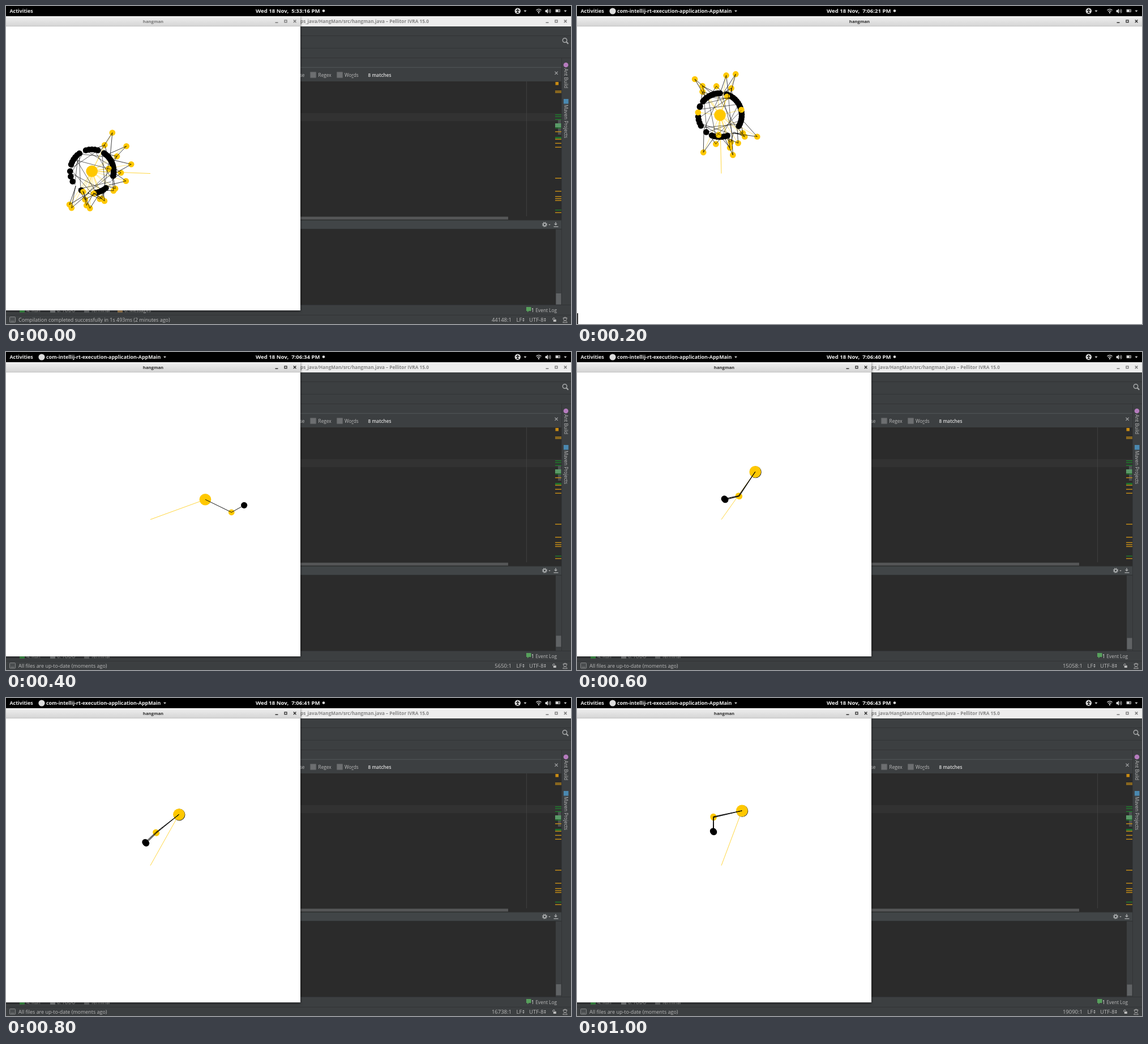
Recreate the animation shown at these times as an HTML page. Size 998 px wide and 561 px high, loop 1.2 s.

```html
<!DOCTYPE html>
<html lang="en">
<head>
<meta charset="utf-8">
<title>hangman</title>
<style>
html, body { margin: 0; width: 100%; height: 100%; overflow: hidden; background: #3c3f41; }
svg { display: block; width: 100vw; height: 100vh; }
text { font: 8.3px "Open Sans", "Noto Sans", sans-serif; fill: #bbb; white-space: pre; }
.bar { font-weight: 700; font-size: 8.9px; fill: #eee; }
.clock { font-weight: 700; font-size: 9.6px; fill: #eee; }
.title { font-weight: 700; font-size: 7.7px; }
.status { font-size: 8.95px; }
.caret { font-size: 9.5px; }
.win { filter: drop-shadow(0 1px 2px rgba(0, 0, 0, .6)); }
.frame { visibility: hidden; animation: show 1200ms step-end infinite; }
@keyframes show {
  0% { visibility: visible; }
  16.6666%, 100% { visibility: hidden; }
}
</style>
</head>
<body>
<svg viewBox="0 0 998 561" preserveAspectRatio="none">
  <defs>
    <linearGradient id="chrome" x2="0" y2="1">
      <stop stop-color="#fff"/><stop offset=".06" stop-color="#eee"/><stop offset="1" stop-color="#d4d4d4"/>
    </linearGradient>
    <g id="buttons" fill="none" stroke="currentColor">
      <path d="M-34.5 29.3h5" stroke-width="1.5"/>
      <rect x="-18" y="25" width="4" height="3.8" stroke-width="1.3"/>
      <path d="M-2.2 24.6l4.6 4.6m0-4.6l-4.6 4.6" stroke-width="1.4"/>
    </g>
    <path id="drop" d="M-2.5-1.3h5l-2.5 2.9z"/>
    <path id="updown" d="M-1.8-.8l1.8-2.4 1.8 2.4zM-1.8.8l1.8 2.4 1.8-2.4z" fill="#bbb"/>
    <rect id="check" y="116.3" width="10.5" height="10.5" rx="1" fill="#6c6e70" stroke="#55585a" stroke-width=".7"/>
  </defs>

  <!-- editor window -->
  <rect width="998" height="561" fill="#3c3f41"/>
  <rect x="515" y="18" width="483" height="18" fill="#ededed"/>
  <text class="title" x="520" y="30" style="fill:#858585;font-size:8.2px">ps_java/HangMan/src/hangman.java – Pellitor IVRA 15.0</text>
  <use href="#buttons" x="988" color="#777"/>
  <g stroke="#303234" stroke-width=".8">
    <path d="M519 52.5h479M519 74.5h479M519 91.5h479M981.5 92v435M519 527.4h479M0 545.3h998"/>
    <path d="M519 108.3h462" stroke="#5a5d5f"/>
  </g>
  <g fill="none" stroke="#a5a7a8">
    <circle cx="987" cy="60.5" r="3.7" stroke-width="1.5"/>
    <path d="M989.8 63.3l3.4 3.5" stroke-width="2.1"/>
    <path d="M969.5 115.7l5.2 5.2m0-5.2l-5.2 5.2" stroke-width="1.2"/>
  </g>
  <text x="527.5" y="125" text-anchor="end">Match Case</text>
  <use href="#check" x="537.3"/><use href="#check" x="584.3"/>
  <text x="551.5" y="125">Re<tspan text-decoration="underline">g</tspan>ex</text>
  <text x="598" y="125">Wo<tspan text-decoration="underline">r</tspan>ds</text>
  <text x="639.5" y="125" style="font-weight:600;fill:#ddd">8 matches</text>

  <rect x="515" y="133" width="466" height="244.5" fill="#2b2b2b"/>
  <rect x="515" y="189" width="466" height="14" fill="#323232"/>
  <path d="M919.5 133v238" stroke="#444" stroke-width=".8"/>
  <rect x="515" y="371.7" width="372" height="5" fill="#555657"/>
  <rect x="975" y="200" width="5.5" height="27" fill="#4d5052"/>
  <rect x="970.5" y="134" width="5.5" height="5.5" fill="#c88a12"/>
  <g id="marks"></g>
  <rect x="970" y="207" width="10.5" height="7" fill="#5a9a68"/>

  <rect x="515" y="378" width="466" height="15.5" fill="#414547"/>
  <path d="M519 377.8h462M519 393.6h462" stroke="#2a2c2d" stroke-width=".8"/>
  <rect x="515" y="394" width="456" height="133" fill="#2b2b2b"/>
  <g stroke="#b0b2b3" fill="none">
    <circle cx="951.5" cy="385.5" r="2.5" stroke-width="1.7"/>
    <circle cx="951.5" cy="385.5" r="4" stroke-width="1.2" stroke-dasharray="1.57"/>
    <path d="M971 381v5m-2.2-2l2.2 2.2 2.2-2.2M967.5 389.3h8" stroke-width="1.2"/>
  </g>
  <use href="#drop" transform="translate(960 386) scale(.7)" fill="#aaa"/>

  <circle cx="989" cy="104" r="4.3" fill="#b57bbd"/>
  <rect x="985" y="164" width="8.5" height="8.5" fill="#4a88b0"/>
  <text transform="translate(986 110) rotate(90)">Ant Build</text>
  <text transform="translate(986 174) rotate(90)">Maven Projects</text>

  <path d="M919 531h8.5v7h-4l-2.5 2.5v-2.5h-2z" fill="#57a05c"/>
  <text x="928" y="540" style="fill:#eee">1</text>
  <text x="935.5" y="540">Event Log</text>

  <rect x="6.5" y="548.5" width="10" height="9.5" rx="1" fill="#4b4e50" stroke="#8c8e8f" stroke-width=".9"/>
  <path d="M8.5 556h6" stroke="#8c8e8f" stroke-width=".8"/>
  <text class="caret" x="901.5" y="557">LF</text><use href="#updown" x="914" y="553.5"/>
  <text class="caret" x="924" y="557">UTF-8</text><use href="#updown" x="952" y="553.5"/>
  <path d="M965.8 553.5v-1.5a1.8 1.8 0 0 1 3.6 0" fill="none" stroke="#bbb"/>
  <rect x="966.8" y="553" width="5" height="4" fill="#bbb"/>
  <g fill="none" stroke="#aaa" stroke-width=".9">
    <circle cx="987.5" cy="552" r="3"/><path d="M983.5 550.5h8M983.8 558.5c0-4 7.4-4 7.4 0z"/>
  </g>

  <g id="frames"></g>

  <!-- desktop panel icons -->
  <g fill="#ddd">
    <circle cx="561" cy="8.5" r="2.3"/>
    <circle cx="903.8" cy="8.8" r="5.2"/>
    <circle cx="903.8" cy="6" r="1" fill="#000"/>
    <path d="M900.8 7.9h6M903.8 8v2l-1.8 2.8M903.8 10l1.8 2.8" fill="none" stroke="#000" stroke-width="1.1"/>
    <use href="#drop" x="917" y="9"/><use href="#drop" x="988" y="9"/>
    <path d="M936.5 7.5q4.5-3.6 9 0M938.3 9.7q2.7-2 5.4 0" fill="none" stroke="#ddd" stroke-width="1.2"/>
    <circle cx="941" cy="11.8" r="1.2"/>
    <path d="M952.5 7.3h2l2.7-2.5v8.4l-2.7-2.5h-2z"/>
    <path d="M958.8 6.7q1.6 2.3 0 4.6M960.7 5.3q2.7 3.7 0 7.4" fill="none" stroke="#ddd"/>
    <rect x="971" y="6.3" width="7.5" height="4.2" fill="#555" stroke="#ccc" stroke-width=".8"/>
    <rect x="971.4" y="6.6" width="4" height="3.6"/>
  </g>
</svg>
<script>
const GOLD = '#ffc800';
const PIVOT = [255, 295.5];
const BEAM = 103.2, UPPER = 51.5, LOWER = 25.6, RING = 38.5;
const $ = id => document.getElementById(id);

const text = (x, y, s, cls = '', attrs = '') => `<text x="${x}" y="${y}" class="${cls}" ${attrs}>${s}</text>`;
const rect = (x, y, w, h, fill) => `<rect x="${x}" y="${y}" width="${w}" height="${h}" fill="${fill}"/>`;
const ball = ([x, y], r, fill) => `<circle cx="${x}" cy="${y}" r="${r}" fill="${fill}"/>`;
const line = (a, b, color = '#000', w = .75) =>
  `<path d="M${a[0]} ${a[1]}L${b[0]} ${b[1]}" stroke="${color}" stroke-width="${w}"/>`;
const range = (n, f) => Array.from({ length: n }, (_, k) => f(k));

// point at an angle in degrees, clockwise from the right
function polar([x, y], r, deg) {
  const a = deg * Math.PI / 180;
  return [x + r * Math.cos(a), y + r * Math.sin(a)];
}

function random(seed) {
  return () => (seed = seed * 16807 % 2147483647) / 2147483647;
}

const stripe = (color, ys) => ys.map(y => rect(970, y, 11, 1.5, color)).join('');
$('marks').innerHTML =
  stripe('#c08a18', [149.4, 151.8, 221, 234.3, 241.5, 248.4, 303, 326, 335.5, 339, 342.4, 363.7]) +
  stripe('#1f7a2c', [191, 194.5, 199.5, 214.5, 231, 232.5, 359.3]);

const hubBall = ([x, y], rim) => (rim ? ball([x + .6, y + .5], 10.4, '#222') : '') + ball([x, y], 10.3, GOLD);

// double pendulum hanging from a beam; drift in degrees fans out close copies
function arm(beam, upper, lower, drift = 0) {
  const hub = polar(PIVOT, BEAM, beam);
  const copies = (drift ? [.5, 0, -.5] : [0]).map(k => {
    const elbow = polar(hub, UPPER, upper + k * drift);
    return { elbow, tip: polar(elbow, LOWER, lower + k * drift) };
  });
  return line(PIVOT, hub, GOLD) + hubBall(hub, drift) +
    copies.map(c => ball(c.elbow, 5.4, GOLD) + ball(c.tip, 5.6, '#000')).join('') +
    copies.map(c => line(hub, c.elbow, '#000', .9) + line(c.elbow, c.tip, '#000', .9)).join('');
}

const fan = (n, from, step, radius) => range(n, k => [radius(k), from + step * k]);

// many pendulums at once: black balls along ring arcs, gold balls in fans
function swarm(hub, seed, arcs, fans) {
  const rnd = random(seed);
  const on = deg => polar(hub, RING, deg);
  const black = arcs.flatMap(([n, from, to]) => range(n, k => on(from + (to - from) * k / (n - 1 || 1))));
  const gold = fans.flat().map(([r, deg]) => ({ r, deg, at: polar(hub, r, deg) }));
  const ties = gold.filter(g => g.r > RING + 6).map(g =>
    line(g.at, on(g.deg - 5 - 25 * rnd())) + line(g.at, on(g.deg + 5 + 25 * rnd())));
  const chords = range(16, k => {
    const a = k * 22.5 + 15 * rnd();
    return line(on(a), on(a + 75 + 75 * rnd()), '#000', .6);
  });
  return line(PIVOT, hub, GOLD) +
    gold.map(g => line(hub, g.at, GOLD, .5)).join('') +
    hubBall(hub) +
    black.map(p => ball(p, 5.3, '#000')).join('') +
    gold.map(g => ball(g.at, 5.3, GOLD)).join('') +
    ties.join('') + chords.join('');
}

const elbows = () => UPPER;

const low = swarm([151.7, 291.5], 7,
  [[3, 152, 180], [6, 198, 235], [5, 254, 286], [14, 304, 372], [5, 50, 80], [1, 119, 119]],
  [
    fan(5, -62, 26, k => 77 - 1.6 * k * k),
    fan(6, -64, 33.5, elbows),
    fan(3, 67, 26, k => 57 + 8.5 * k),
    fan(3, 74, 25, k => 51 + 10 * k),
    fan(2, 85, 28, () => 39.5),
    fan(1, -9, 0, () => 30)
  ]);

const high = swarm([252.5, 192.5], 11,
  [[11, 219, 270], [17, 288, 390], [7, 70, 112], [1, 129, 129], [4, 151, 176], [2, 202, 204]],
  [
    fan(2, -125, 56, () => 77.5),
    fan(3, -127, 30, elbows),
    fan(2, -121, 40, k => 60 + 11 * k),
    fan(3, 30, 42, k => 76 - 2 * k),
    fan(3, 38, 30, elbows),
    fan(3, 41, 16, k => 58 + k),
    fan(2, -69, 163, () => 35),
    fan(2, -14, 201, () => 39)
  ]);

const tab = (x, label, color) => rect(x, 532, 9, 8.5, color) + text(x + 12, 540, label);

function ide(status, caret, scroll) {
  return tab(24, '4: Run', '#3f9f4a') + tab(78, '6: TODO', '#8a8d8f') + tab(138, 'Terminal', '#77797b') +
    rect(971.5, scroll, 9, 19.5, '#606365') +
    text(22, 557, status, 'status') + text(893, 557, caret, 'caret', 'text-anchor="end"');
}

function appWindow(w, h, color) {
  const body = rect(-4, 18, w + 4, 18 + h, '#fff') + rect(-4, 18, w + 4, 18, 'url(#chrome)') +
    rect(-4, 35.4, w + 4, .7, '#bcbcbc');
  return `<g class="win">${body}</g>` +
    text(w / 2, 30, 'hangman', 'title', `text-anchor="middle" style="fill:${color}"`) +
    `<use href="#buttons" x="${w - 10}" color="${color}"/>`;
}

const panel = (time, menu) => rect(0, 0, 998, 18, '#000') +
  text(6.5, 12.3, 'Activities', 'bar') +
  text(441, 12.3, `Wed 18 Nov,&#160; ${time} PM`, 'clock') +
  (menu ? ball([63, 9], 5.6, '#ddd') +
    text(71, 12.3, 'com-intellij-rt-execution-application-AppMain', 'bar') +
    '<use href="#drop" x="280.5" y="9" fill="#ddd"/>' : '');

const small = (time, caret, scroll, pendulum) =>
  ide('All files are up-to-date (moments ago)', caret, scroll) +
  appWindow(520, 501, '#2e2e2e') + pendulum + panel(time, true);

const scenes = [
  ide('Compilation completed successfully in 1s 493ms (2 minutes ago)', '44148:1', 507) +
    tab(197, '0: Messages', '#b08a58') + appWindow(520, 501, '#777') + low + panel('5:33:16'),
  appWindow(998, 525, '#2e2e2e') + rect(0, 542, 2, 19, '#333') + high + panel('7:06:21', true),
  small('7:06:34', '5650:1', 500.5, arm(-20, 26, -29)),
  small('7:06:40', '15058:1', 504.5, arm(-54.6, 124, 167, 2)),
  small('7:06:41', '16738:1', 505, arm(-60.7, 141.5, 136, 2)),
  small('7:06:43', '19090:1', 505.5, arm(-69.4, 167.5, 90, 2))
];

$('frames').innerHTML = scenes.map((s, i) =>
  `<g class="frame" style="animation-delay:${i * 200 - 1200}ms">${s}</g>`).join('');
</script>
</body>
</html>
```
